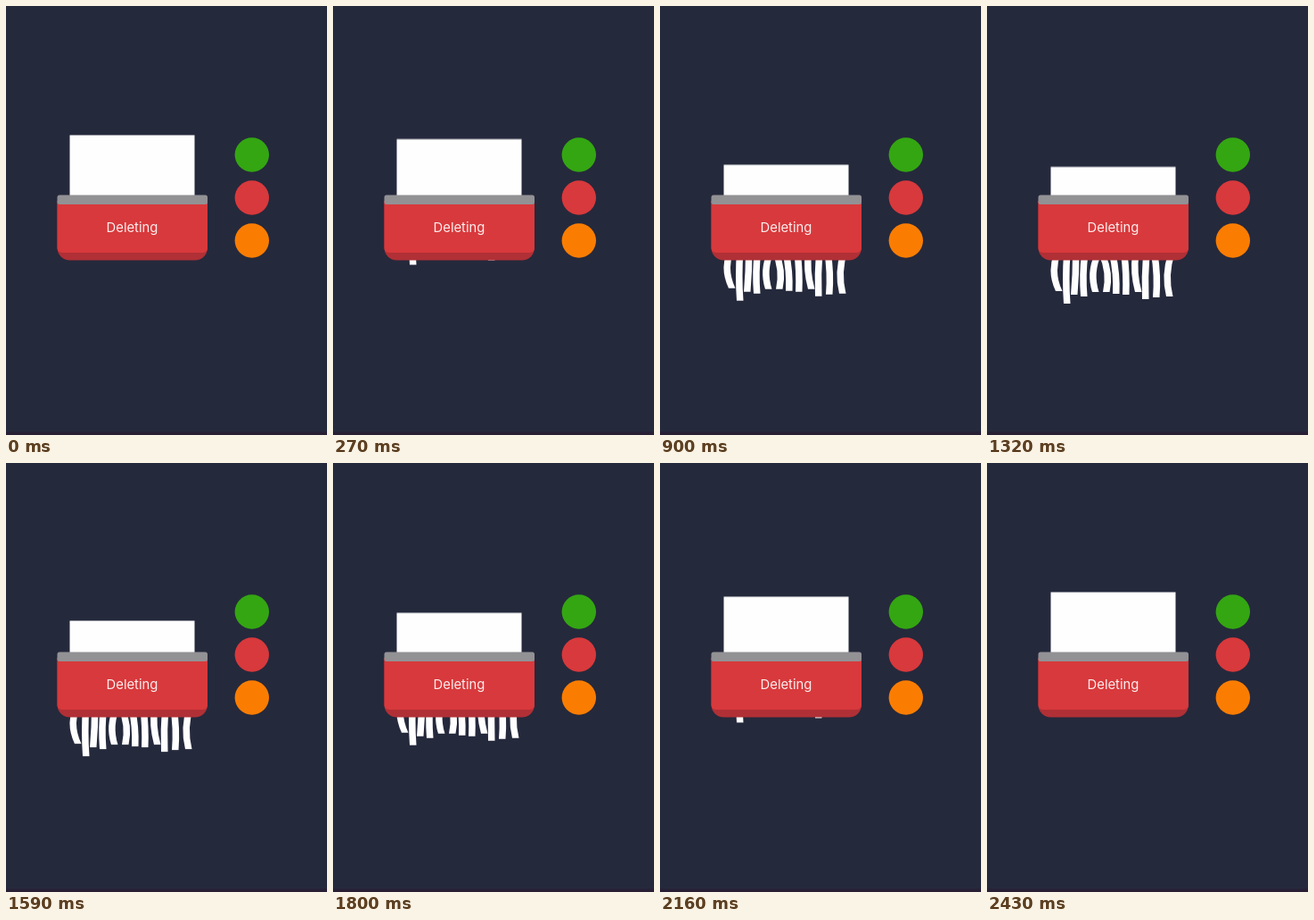
Write an HTML page that moves like this. It is 360 by 480 pixels and loops after 2460 ms.

```html
<!DOCTYPE html>
<html lang="en">
<head>
<meta charset="utf-8">
<title>Shredder</title>
<style>
  html, body { margin: 0; width: 100%; height: 100%; overflow: hidden; background: #25293c; }
  svg { display: block; width: 360px; height: 480px; }
  text { font: 400 14.8px Inter, Roboto, sans-serif; fill: #fbeeee; text-anchor: middle; }
</style>
</head>
<body>
<svg viewBox="0 0 360 480">
  <rect width="360" height="480" fill="#25293c"/>
  <rect y="476.5" width="360" height="3.5" fill="#281f35"/>
  <rect id="paper" x="71.5" y="144.5" width="140" height="72" fill="#fefefe"/>
  <g id="strips" fill="#fefefe"></g>
  <path d="M57.5 218H226V270.5a14 14 0 0 1-14 14H71.5a14 14 0 0 1-14-14Z" fill="#b03036"/>
  <path d="M57.5 218H226V271a5 5 0 0 1-5 5H62.5a5 5 0 0 1-5-5Z" fill="#d8393c"/>
  <rect x="57.5" y="211.5" width="168.5" height="10.5" rx="2.5" fill="#929194"/>
  <text x="141.5" y="253">Deleting</text>
  <circle cx="275.8" cy="166.5" r="19.2" fill="#34a612"/>
  <circle cx="275.8" cy="214.5" r="19.2" fill="#d8393c"/>
  <circle cx="275.8" cy="262.5" r="19.2" fill="#fa7d02"/>
</svg>
<script>
const LOOP = 2460, MOVE = 1100, BACK = 1350;
const TOP = 274, WIDTH = 7.5;

// left edge of each strip: top x, bend x, bottom x, bottom y
const strips = [
  [75, 67, 77, 316], [86, 84, 86, 330], [96, 96, 94, 320], [106, 103, 105, 322],
  [121, 111, 118, 317], [125, 135, 130, 317], [137, 142, 141, 319], [150, 153, 152, 320],
  [163, 160, 166, 317], [175, 173, 174, 325], [184, 188, 186, 323], [203, 195, 201, 322]
];

const byId = id => document.getElementById(id);

byId('strips').innerHTML = strips.map(([x, bend, end, y]) => {
  const mid = (TOP + y) / 2;
  return `<path d="M${x} ${TOP}Q${bend} ${mid} ${end} ${y}h${WIDTH}` +
    `Q${bend + WIDTH} ${mid} ${x + WIDTH} ${TOP}Z"/>`;
}).join('');

// down, pause, and back up
function feed(id, from, to) {
  const at = y => `translateY(${y}px)`;
  byId(id).animate([
    { offset: 0, transform: at(from), easing: 'ease-in-out' },
    { offset: MOVE / LOOP, transform: at(to) },
    { offset: BACK / LOOP, transform: at(to), easing: 'ease-in-out' },
    { offset: (BACK + MOVE) / LOOP, transform: at(from) },
    { offset: 1, transform: at(from) }
  ], { duration: LOOP, iterations: Infinity });
}

feed('paper', 0, 35.5);
feed('strips', -46.7, 3);
</script>
</body>
</html>
```
